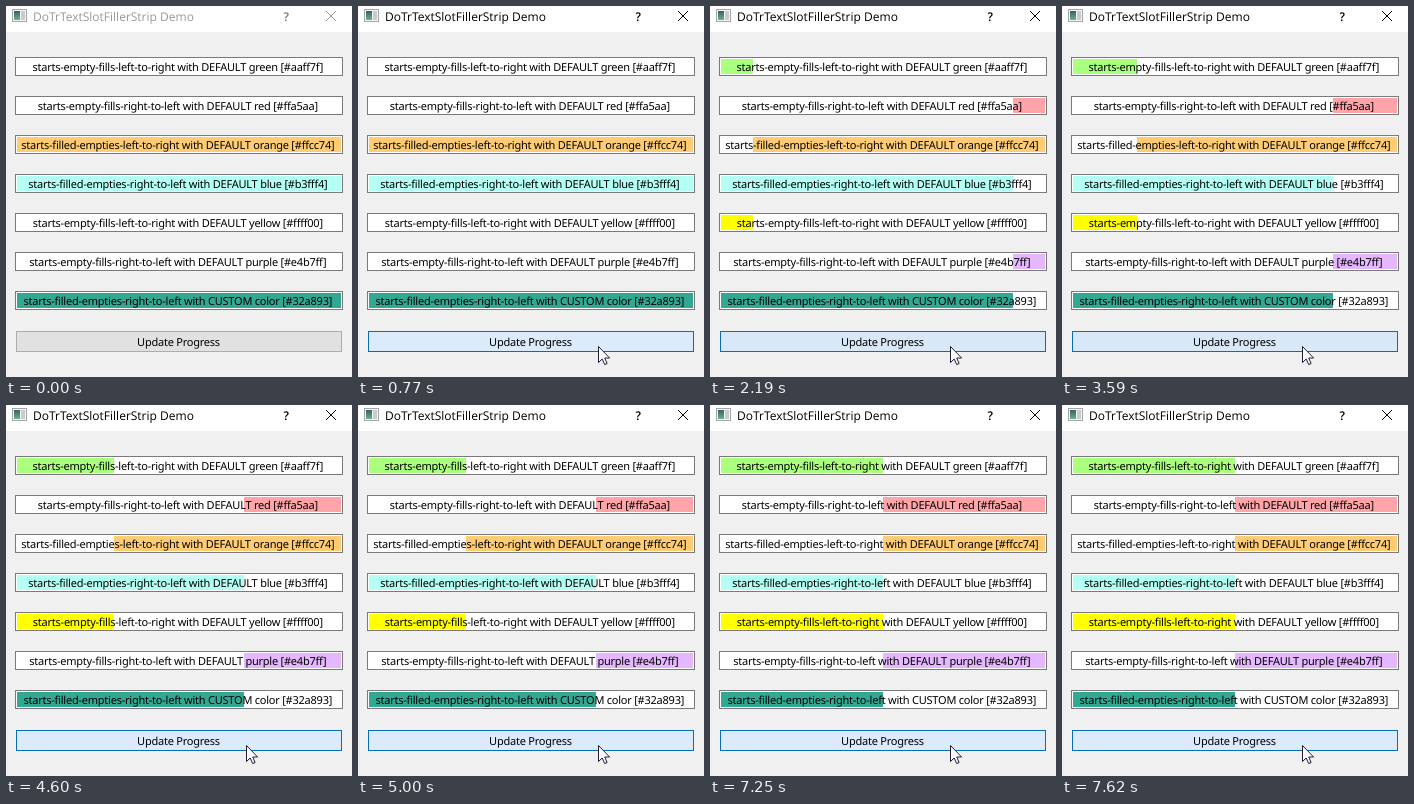
Animation, 346 px wide and 371 px high, one loop 8 s. Source, as an HTML page:

```html
<!DOCTYPE html>
<html lang="en">
<head>
<meta charset="utf-8">
<title>Progress fields</title>
<style>
  html, body { margin: 0; width: 100%; height: 100%; overflow: hidden; background: #f0f0f0; }
  svg { display: block; }
  text { font: 11px "Noto Sans", "Open Sans", sans-serif; letter-spacing: -.23px; text-anchor: middle; text-rendering: geometricPrecision; }
  #caption text { font: 12px "Open Sans", "Noto Sans", sans-serif; letter-spacing: 0; text-anchor: start; }
</style>
</head>
<body>
<svg id="stage" width="346" height="371" viewBox="0 0 346 371">
  <defs>
    <linearGradient id="pane" x2="0" y2="1">
      <stop stop-color="#3d5f66"/>
      <stop offset="1" stop-color="#6fae8c"/>
    </linearGradient>
  </defs>
  <rect width="346" height="26" fill="#fff"/>
  <g id="icon" shape-rendering="crispEdges">
    <rect x="6" y="3" width="15" height="13" fill="#a4a8aa"/>
    <rect x="7" y="4" width="13" height="11" fill="#f4f4f4"/>
    <rect x="8" y="5" width="6" height="9" fill="url(#pane)"/>
    <rect x="15" y="5" width="4" height="9" fill="#c9cccd"/>
  </g>
  <g id="caption">
    <text x="27" y="15">DoTrTextSlotFillerStrip Demo</text>
    <g id="controls">
      <text x="277.5" y="15" style="font-weight:600">?</text>
      <path d="M320 5l10 10M330 5l-10 10" stroke="currentColor"/>
    </g>
  </g>
  <g id="fields"></g>
  <rect id="button" x="10.5" y="325.5" width="325" height="20"/>
  <text x="172.5" y="340">Update Progress</text>
  <path id="cursor" d="M.5 .5V16.5L4.2 13L6.7 18.6L9.1 17.5L6.7 12H11.6Z" fill="#fff" stroke="#1c1c38" stroke-linejoin="round"/>
</svg>
<script>
const LOOP = 8000;
const CLICKS = [1780, 3200, 4600, 6010, 7250];
const LEFT = 10, WIDTH = 326, INSET = 1;
const $ = id => document.getElementById(id);

// name, colour, starts filled, moves left to right
const rows = [
  ['DEFAULT green', '#aaff7f', false, true],
  ['DEFAULT red', '#ffa5aa', false, false],
  ['DEFAULT orange', '#ffcc74', true, true],
  ['DEFAULT blue', '#b3fff4', true, false],
  ['DEFAULT yellow', '#ffff00', false, true],
  ['DEFAULT purple', '#e4b7ff', false, false],
  ['CUSTOM color', '#32a893', true, false]
];

function add(tag, attrs, label = '') {
  const el = document.createElementNS('http://www.w3.org/2000/svg', tag);
  for (const key in attrs) el.setAttribute(key, attrs[key]);
  el.textContent = label;
  return $('fields').appendChild(el);
}

const fills = rows.map(([name, color, filled, ltr], i) => {
  const top = 51 + 39 * i;
  add('rect', { x: 9.5, y: top + .5, width: 327, height: 18, fill: '#fff', stroke: '#7a7a7a' });
  const fill = add('rect', { y: top + 2, height: 15, fill: color, 'shape-rendering': 'crispEdges' });
  const way = ltr ? 'left-to-right' : 'right-to-left';
  add('text', { x: 171.8, y: top + 14 },
    `starts-${filled ? 'filled-empties' : 'empty-fills'}-${way} with ${name} [${color}]`);
  return fill;
});

const ramp = (t, from, to) => Math.min(1, Math.max(0, (t - from) / (to - from)));
const mix = (a, b, k) => a.map((v, i) => v + (b[i] - v) * k);
const rgb = c => `rgb(${c.map(Math.round)})`;

const IDLE = [225, 225, 225], HOVER = [219, 235, 251], RELEASED = [216, 232, 247], PRESSED = [204, 228, 247];
const IDLE_EDGE = [173, 173, 173], HOVER_EDGE = [8, 108, 184], PRESSED_EDGE = [0, 84, 153];

function drawFields(progress) {
  rows.forEach(([, , filled, ltr], i) => {
    const part = WIDTH * (filled ? 1 - progress : progress);
    const fromLeft = ltr !== filled;
    const start = Math.max(LEFT + INSET, fromLeft ? LEFT : LEFT + WIDTH - part);
    const end = Math.min(LEFT + WIDTH - INSET, fromLeft ? LEFT + part : LEFT + WIDTH);
    fills[i].setAttribute('x', start);
    fills[i].setAttribute('width', Math.max(0, end - start));
  });
}

function drawButton(t, count) {
  const hover = ramp(t, 450, 720);
  let face = mix(IDLE, HOVER, hover), edge = mix(IDLE_EDGE, HOVER_EDGE, hover);
  if (count) {
    const since = t - CLICKS[count - 1];
    const press = ramp(since, 0, 150) * (1 - ramp(since, 250, 370));
    face = mix(count < 3 ? RELEASED : HOVER, PRESSED, press);
    edge = mix(HOVER_EDGE, PRESSED_EDGE, press);
  }
  $('button').setAttribute('fill', rgb(face));
  $('button').setAttribute('stroke', rgb(edge));
}

function draw(t) {
  const count = CLICKS.filter(c => t >= c).length;
  drawFields(count / 10);
  drawButton(t, count);

  const active = t >= 370;
  $('caption').setAttribute('fill', active ? '#000' : '#999');
  $('controls').setAttribute('fill', active ? '#000' : '#777');
  $('controls').setAttribute('color', active ? '#000' : '#999');

  const left = (1 - ramp(t, 300, 700)) ** 2;
  $('cursor').setAttribute('transform', `translate(${240 + 14 * left} ${340 + 34 * left})`);
}

function tick() {
  draw(performance.now() % LOOP);
  requestAnimationFrame(tick);
}
tick();
</script>
</body>
</html>
```
